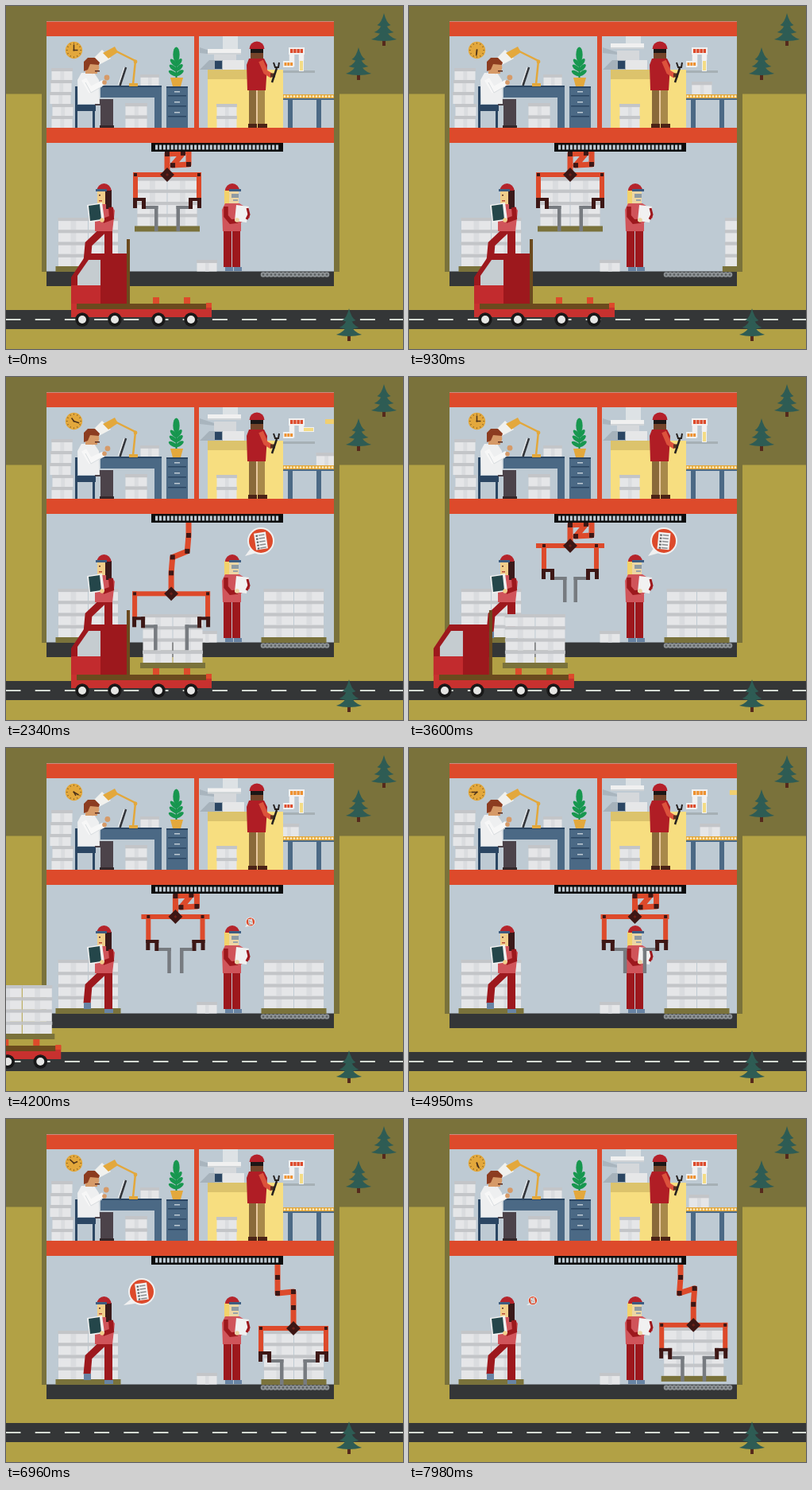
Recreate the animation shown at these times as an HTML page with a canvas. Size 500 by 431 pixels, loop 8000 ms.

```html
<!DOCTYPE html>
<html lang="en">
<head>
<meta charset="utf-8">
<title>Warehouse</title>
<style>
html, body { margin: 0; width: 100%; height: 100%; overflow: hidden; background: #b2a145; }
canvas { display: block; width: 500px; height: 431px; }
</style>
</head>
<body>
<canvas id="stage"></canvas>
<script>
const canvas = document.getElementById('stage');
const ctx = canvas.getContext('2d');
const dpr = window.devicePixelRatio || 1;
canvas.width = 500 * dpr;
canvas.height = 431 * dpr;

const LOOP = 8000, SHIFT = 3600, TAU = Math.PI * 2;
const red = '#dd4a2b', deep = '#9d181d', coat = '#d0545a', dark = '#343637', wall = '#becad3',
  olive = '#7a723b', field = '#b2a145', blue = '#4b6985', navy = '#2b4663', gold = '#e3a83c',
  maroon = '#3d1715', white = '#f1f1f1', steel = '#777b80', shoe = '#6884a4', brown = '#6b4a1e',
  skin = '#d69a68', pine = '#2e5c54';

// drawing helpers
function rect(color, x, y, w, h) { ctx.fillStyle = color; ctx.fillRect(x, y, w, h); }
function trace(pts) {
  ctx.beginPath();
  for (let i = 0; i < pts.length; i += 2) ctx.lineTo(pts[i], pts[i + 1]);
}
function poly(color, ...pts) { trace(pts); ctx.fillStyle = color; ctx.fill(); }
function line(color, width, ...pts) {
  trace(pts);
  ctx.strokeStyle = color; ctx.lineWidth = width; ctx.stroke();
}
function disc(color, x, y, r, from = 0, to = TAU) {
  ctx.beginPath(); ctx.arc(x, y, r, from, to);
  ctx.fillStyle = color; ctx.fill();
}
function placed(x, y, draw, turn = 0, scale = 1, flip = 1) {
  ctx.save(); ctx.translate(x, y); ctx.rotate(turn); ctx.scale(scale * flip, scale);
  draw(); ctx.restore();
}
function clipped(x, y, w, h, draw) {
  ctx.save(); ctx.beginPath(); ctx.rect(x, y, w, h); ctx.clip();
  draw(); ctx.restore();
}

// timing helpers
const clamp = (v, lo, hi) => Math.min(hi, Math.max(lo, v));
function ramp(t, start, end) {
  const u = clamp((t - start) / (end - start), 0, 1);
  return u * u * (3 - 2 * u);
}
const bump = k => 4 * k * (1 - k);

function carton(x, y, w, h) {
  rect('#e5e6e8', x + .5, y, w - 1, h);
  rect('#dadcdf', x + w * .42, y, w * .18, h);
  rect('#c3c5c8', x, y, w, h * .27);
}
function stack(cx, base) {
  for (let i = 0; i < 8; i++) carton(cx - 38 + i % 2 * 38, base - 61 + (i >> 1) * 15.25, 38, 15.25);
  rect(olive, cx - 41, base, 82, 7);
}
function tree(x, y) {
  rect('#55291c', x - 2, y + 33, 4, 8);
  ctx.fillStyle = pine;
  for (let i = 0; i < 3; i++) {
    const top = y + i * 9, half = 8.5 + i * 3.8, low = top + 16;
    ctx.beginPath();
    ctx.moveTo(x, top);
    ctx.quadraticCurveTo(x + half * .35, low - 4, x + half, low - 1);
    ctx.quadraticCurveTo(x, low + 3, x - half, low - 1);
    ctx.quadraticCurveTo(x - half * .35, low - 4, x, top);
    ctx.fill();
  }
}

function ground() {
  rect(field, 0, 0, 500, 431);
  rect(olive, 0, 0, 500, 110.5);
  rect(olive, 45, 110, 375, 224);
  rect(wall, 51, 19, 362, 315);
  rect(red, 51, 19.5, 362, 18.5);
  rect(red, 51, 153, 362, 19);
  rect(red, 237, 38, 6, 115);
  rect(dark, 51, 333.5, 362, 18.5);
  rect(dark, 0, 382, 500, 24);
  for (let x = -.5; x < 500; x += 37.2) rect('#d5dbd3', x, 393, 19, 2);
  tree(476, 9);
  tree(444, 52);
  for (let x = 324; x < 409; x += 5) {
    disc('#8d9295', x, 337.5, 3.3);
    disc('#565a5c', x, 337.5, 1.2);
  }
}

function clock(turn) {
  const hand = (color, width, length, angle, from = 1) =>
    placed(85.5, 55.5, () => line(color, width, 0, from, 0, -length), angle);
  disc(gold, 85.5, 55.5, 10.7);
  for (let i = 0; i < 12; i++) hand('#8d6522', 1, 9.6, i * TAU / 12, -7.8);
  hand('#4c321a', 1.5, 7, turn * 2);
  hand('#4c321a', 1.5, 5, turn + TAU / 4);
}

function plant() {
  poly(gold, 207, 90, 223, 90, 220, 101, 210, 101);
  line('#14884a', 2, 214.5, 90, 214.5, 70);
  ctx.fillStyle = '#17974f';
  for (let i = 0; i < 7; i++) {
    const side = i % 2 * 2 - 1, lift = 87 - (i >> 1) * 6;
    placed(214.5, lift, () => {
      ctx.beginPath();
      ctx.ellipse(0, -5, 2.6, 6, 0, 0, TAU);
      ctx.fill();
    }, i < 6 ? side * (1.05 - i * .08) : 0, i < 6 ? 1 : 1.6);
  }
}

function office(t, p) {
  clock(p / SHIFT * TAU);
  for (let i = 0; i < 5; i++) carton(55 + (i * 3 + 2) % 4, 78 + i * 15, 27, 15);
  // chair
  rect(navy, 87, 101, 3, 52);
  rect(navy, 87, 124, 26, 8);
  rect(navy, 109, 130, 3, 23);
  // desk
  carton(150, 122, 28, 15.5);
  carton(150, 137.5, 28, 15.5);
  rect(blue, 119, 100, 77, 15);
  rect(navy, 119, 100, 77, 2);
  rect(blue, 187, 115, 9, 38);
  carton(169, 86, 24, 14);
  // lamp
  poly('#f1f1ee', 121, 55, 132, 66, 117, 74, 110, 66);
  line(gold, 2.5, 160, 98, 163, 69, 137, 56);
  poly(gold, 137, 51, 141, 58, 129, 66, 122, 59);
  rect(gold, 155, 97, 11, 4);
  disc(gold, 163, 70, 2.4);
  // clerk
  rect('#4c434a', 112, 117, 23, 8);
  rect('#4c434a', 119, 117, 16, 33);
  rect('#33272a', 118, 150, 18, 3);
  poly('#eeeff0', 95, 84, 111, 84, 117, 93, 118, 123, 91, 123, 90, 93);
  rect(skin, 100, 72, 15, 13);
  disc(skin, 109, 77, 8.3);
  poly('#8c3c20', 98, 82, 98, 70, 103, 65, 112, 65, 118, 71, 117, 74, 106, 73, 103, 80);
  rect('#5a2a1c', 112, 81, 6, 1.5);
  const tap = Math.sin(t / 75), reach = Math.sin(p / SHIFT * TAU * 2);
  line('#f7f7f7', 7, 98, 92, 106, 105, 123, 96 + reach);
  line('#d9dde0', 1, 100, 96, 107, 109, 121, 101);
  disc(skin, 127 + reach, 90 + tap, 3.4);
  disc(skin, 124, 96 - tap, 2.8);
  // laptop
  line('#33353a', 2.6, 143.5, 100, 151, 77);
  line('#e8eaec', 1.2, 141.5, 99, 149, 77);
  // cabinet
  rect(blue, 202, 101, 27, 52);
  rect(navy, 202, 101, 27, 2);
  for (let y = 112; y < 150; y += 13) {
    rect(navy, 204, y, 23, 1.5);
    rect(wall, 212, y - 5, 7, 1.5);
  }
  plant();
}

function workshop(p) {
  const head = 54 - 7 * (ramp(p, 400, 800) - ramp(p, 2700, 3250));
  const reach = 12 * (ramp(p, 900, 1500) - ramp(p, 2600, 3200));
  const bend = -TAU / 4 * (ramp(p, 1600, 2200) - ramp(p, 2700, 3250));
  const parcel = 322 + .0245 * p + 11 * ramp(p, 400, 760);
  // press
  poly('#a9b5be', 244, 52, 262, 58, 262, 61, 244, 59);
  rect('#d5d8db', 262, 56, 28, 13);
  rect('#dde2e5', 273, 38, 19, head - 38);
  rect('#f0f0f0', 254, head, 42, 5);
  rect('#cfd3d6', 254, head + 5, 42, 2);
  poly('#a6b2bb', 244, 80, 256, 68, 297, 68, 297, 80);
  rect(navy, 263, 69, 9, 10);
  rect('#e6e7e8', 273, 68, 27, 12);
  // counter
  rect('#a6b0b5', 345, 81, 44, 3);
  rect('#f7de80', 254, 80, 95, 73);
  rect('#dcc36c', 254, 80, 72, 12);
  carton(265, 123, 26, 15);
  carton(265, 138, 26, 15);
  // feeding pipe and its lamps
  line(white, 6.5, 349, 73, 360, 73, 360, 56, 372, 56, 372, 68);
  placed(372, 66, () => {
    rect(white, -3, -3, 6, 19);
    rect('#f3dc86', -2, 3, 4, 12);
  }, bend);
  rect(white, 356, 52, 20, 9);
  rect(white, 349, 69, 13, 8);
  const lamps = [red, '#ee9130'], lit = Math.floor(p / 390) % 2;
  for (let i = 0; i < 4; i++) rect(lamps[lit], 358 + i * 4.2, 54, 3.4, 5);
  for (let i = 0; i < 3; i++) rect(lamps[1 - lit], 350.5 + i * 3.8, 71, 3, 4);
  // conveyor
  clipped(349, 38, 64, 115, () => {
    rect('#f0cf70', 414 - reach, 53, 14, 6);
    carton(parcel, 95, 26, 16);
  });
  rect(gold, 349, 111, 64, 5);
  for (let x = 351; x < 413; x += 4) disc('#fff3d0', x, 113.5, 1.3);
  rect(blue, 349, 116, 64, 2);
  rect(blue, 355, 116, 6, 37);
  rect(blue, 391, 116, 6, 37);
  // mechanic
  rect('#8a6a3a', 306, 104, 9, 44);
  rect('#e9c9a0', 315, 104, 3, 44);
  rect('#a8894a', 317, 104, 9, 44);
  rect('#4a2216', 305, 148, 11, 5);
  rect('#4a2216', 317, 148, 12, 5);
  rect('#75442a', 308, 50, 16, 17);
  disc('#b5202a', 316, 54, 9.5, TAU / 2, TAU);
  rect('#1c1716', 308, 54, 16, 5);
  poly('#b01d25', 306, 66, 325, 66, 329, 74, 327, 106, 304, 106, 303, 74);
  line('#dc523c', 6, 321, 69, 327, 83, 335, 88);
  line('#5c3220', 5, 333, 87, 339, 87);
  line('#25201f', 2.5, 335, 96, 341, 78);
  line('#25201f', 2, 337, 71, 339, 77, 343, 77, 344, 71);
}

function cap(x) {
  disc('#b5242b', x, 232, 9, TAU / 2, TAU);
}
function leftClerk() {
  line(deep, 10, 129, 280, 129, 329);
  line(deep, 9, 123, 281, 104, 299, 102, 321);
  rect(shoe, 98, 320, 9, 8);
  rect(shoe, 124, 328, 11, 5);
  rect('#f1ce8a', 115, 232, 13, 18);
  rect('#3a1a1a', 125, 231, 8, 25);
  cap(123.5);
  rect('#3d5d82', 113, 230, 14, 3);
  rect('#55302a', 117, 237, 2, 1.5);
  rect('#b84a3a', 117, 244, 4, 1.5);
  poly(coat, 114, 249, 131, 249, 137, 257, 134, 283, 112, 283, 112, 262);
  rect('#3a1a1a', 126, 246, 7, 9);
  line(deep, 6, 132, 253, 133, 266, 122, 270);
  poly(white, 102, 250, 121, 247, 124, 269, 105, 272);
  poly('#24464a', 104, 251, 118, 249, 120, 268, 106, 270);
  disc('#f1ce8a', 121, 269, 2.8);
}
function rightClerk() {
  for (const x of [274, 285]) {
    rect(deep, x, 281, 10, 47);
    rect(shoe, x + 2, 328, 10, 5);
  }
  rect('#f2d26b', 275, 231, 10, 19);
  rect('#ecd6a4', 281, 232, 12, 16);
  cap(285);
  rect('#3d5d82', 281, 230, 15, 3);
  rect('#8f9ba3', 284, 236, 9, 5);
  rect('#9aa3a8', 286, 243, 6, 2);
  poly(coat, 276, 248, 294, 248, 305, 255, 307, 266, 296, 272, 296, 283, 273, 283, 272, 256);
  line(deep, 5.5, 277, 252, 277, 264, 283, 271, 292, 270);
  poly(white, 290, 250, 306, 252, 303, 272, 288, 270);
  line(deep, 3, 304, 254, 306, 262, 303, 268);
  disc('#ecd6a4', 291, 269, 2.8);
}

function truck() {
  rect(brown, 152, 293, 4, 82);
  poly(deep, 82, 376, 82, 341, 102, 311, 152, 311, 152, 376);
  rect('#c22b2e', 82, 351, 37, 24);
  poly('#c5ccd0', 90, 351, 90, 339, 104, 319, 119, 319, 119, 351);
  rect('#c8312f', 82, 374, 177, 17);
  rect(brown, 89, 374, 163, 7);
  rect(red, 185, 366, 8, 8);
  rect(red, 224, 366, 8, 8);
  rect(red, 252, 373, 7, 6);
  for (const x of [96, 137, 192, 233]) {
    disc('#181818', x, 394, 8.7);
    disc('#e6e6e4', x, 394, 5);
  }
}

// crane pose: trolley, gripper position and opening
function pose(t) {
  const lower = ramp(t, 980, 1980), lift = ramp(t, 2090, 2820);
  const dive = ramp(t, 5800, 6690), rise = ramp(t, 7850, 8600);
  const trolley = 230 + 112 * ramp(t, 3900, 5500);
  return {
    trolley,
    x: trolley - 27 + 7 * (lower - lift) + 47 * (dive - rise) - 12 * bump(lower) - 27 * bump(dive),
    y: 212 + 83 * (lower - lift) + 51 * (dive - rise),
    open: 6 * ramp(t, 1980, 2150) - 13 * ramp(t, 2400, 3000) + 7 * ramp(t, 3800, 5400)
      + 6 * (ramp(t, 6200, 6600) - ramp(t, 6700, 7050))
  };
}

// elbows: a middle link pivots on the centre so that the outer links keep their length
function arm({ trolley, x, y }) {
  const outer = 20, half = 10, shoulder = 199, wrist = y - 26;
  const dx = (x - trolley) / 2, dy = (wrist - shoulder) / 2, reach = Math.hypot(dx, dy);
  const spread = Math.acos(clamp((outer ** 2 - reach ** 2 - half ** 2) / (2 * reach * half), -1, 1));
  const angle = Math.atan2(dy, dx) + spread * clamp(dx / 8, -1, 1);
  const vx = half * Math.cos(angle), vy = half * Math.sin(angle);
  const cx = trolley + dx, cy = shoulder + dy;
  return [trolley, shoulder, cx + vx, cy + vy, cx - vx, cy - vy, x, wrist, x, y];
}

function crane(state) {
  const { trolley, x, y, open } = state, joints = arm(state);
  ctx.lineJoin = 'round';
  line(red, 7, trolley, 180, ...joints);
  ctx.lineJoin = 'miter';
  for (let i = 0; i < 8; i += 2) rect(maroon, joints[i] - 3, joints[i + 1] - 3, 6, 6);
  const half = 43 + Math.max(0, open), claw = 40 + open, fork = 13.5 + open;
  rect(red, x - half, y - 3, half * 2, 6);
  for (const side of [-1, 1]) placed(x, y, () => {
    rect(red, claw - 3, -3, 6, 33);
    rect(maroon, claw - 2, -2, 4, 4);
    rect(steel, fork - 2, 39, claw - fork - 11, 4);
    rect(steel, fork - 2, 39, 4.5, 32);
    rect(maroon, claw - 13, 29, 16, 4);
    rect(maroon, claw - 2, 29, 5, 13);
    rect(maroon, claw - 13, 29, 5, 14);
  }, 0, 1, side);
  placed(x, y, () => {
    rect(maroon, -6.3, -6.3, 12.6, 12.6);
    rect('#6b211a', -1.5, -1.5, 3, 3);
  }, TAU / 8);
}

function rail() {
  rect('#0d0d0d', 183, 172, 166, 11);
  for (let x = 188; x < 344; x += 4.9) rect(wall, x, 174.5, 3.2, 6);
}

function bubble(t, tipX, tipY, cx, cy, start, end) {
  const scale = ramp(t, start, start + 200) - ramp(t, end - 250, end);
  if (scale <= 0) return;
  placed(tipX, tipY, () => {
    poly(white, 0, 0, cx - 12, cy + 8, cx - 2, cy + 14);
    disc(white, cx, cy, 17);
    disc(red, cx, cy, 15);
    placed(cx, cy, () => {
      rect(white, -7.5, -10.5, 15, 21);
      for (let y = -8; y < 9; y += 4) {
        rect('#55595c', -5.5, y, 2.5, 2);
        rect('#8a8d90', -2, y, 7.5, 1.5);
      }
    }, -.15 * Math.sin((t - start) / 150));
  }, 0, scale);
}

function render(t) {
  ctx.setTransform(dpr, 0, 0, dpr, 0, 0);
  const state = pose(t), p = t % SHIFT;
  const drive = -1.22e-4 * Math.max(0, t - 2954) ** 2;
  const slide = clamp((1690 - t) / 850, 0, 1);

  ground();
  office(t, p);
  workshop(p);
  stack(103.5, 327);
  carton(240, 319, 26, 14.5);
  leftClerk();
  rightClerk();
  placed(drive, 0, truck);

  if (t < 2040) stack(state.x, state.y + 64.5);
  else stack(210 + drive, 359);
  clipped(51, 172, 362, 162, () => {
    if (t < 7600) stack(362.5 + 92 * slide ** 2, 327);
    else stack(state.x + .5, state.y + 64);
  });

  crane(state);
  rail();
  bubble(t, 301, 225, 20, -19, 2080, 4300);
  bubble(t, 148, 234, 23, -17, 5850, 8080);
  tree(432, 380);
}

const began = performance.now();
function tick() {
  render((performance.now() - began) % LOOP);
  requestAnimationFrame(tick);
}
tick();
</script>
</body>
</html>
```
